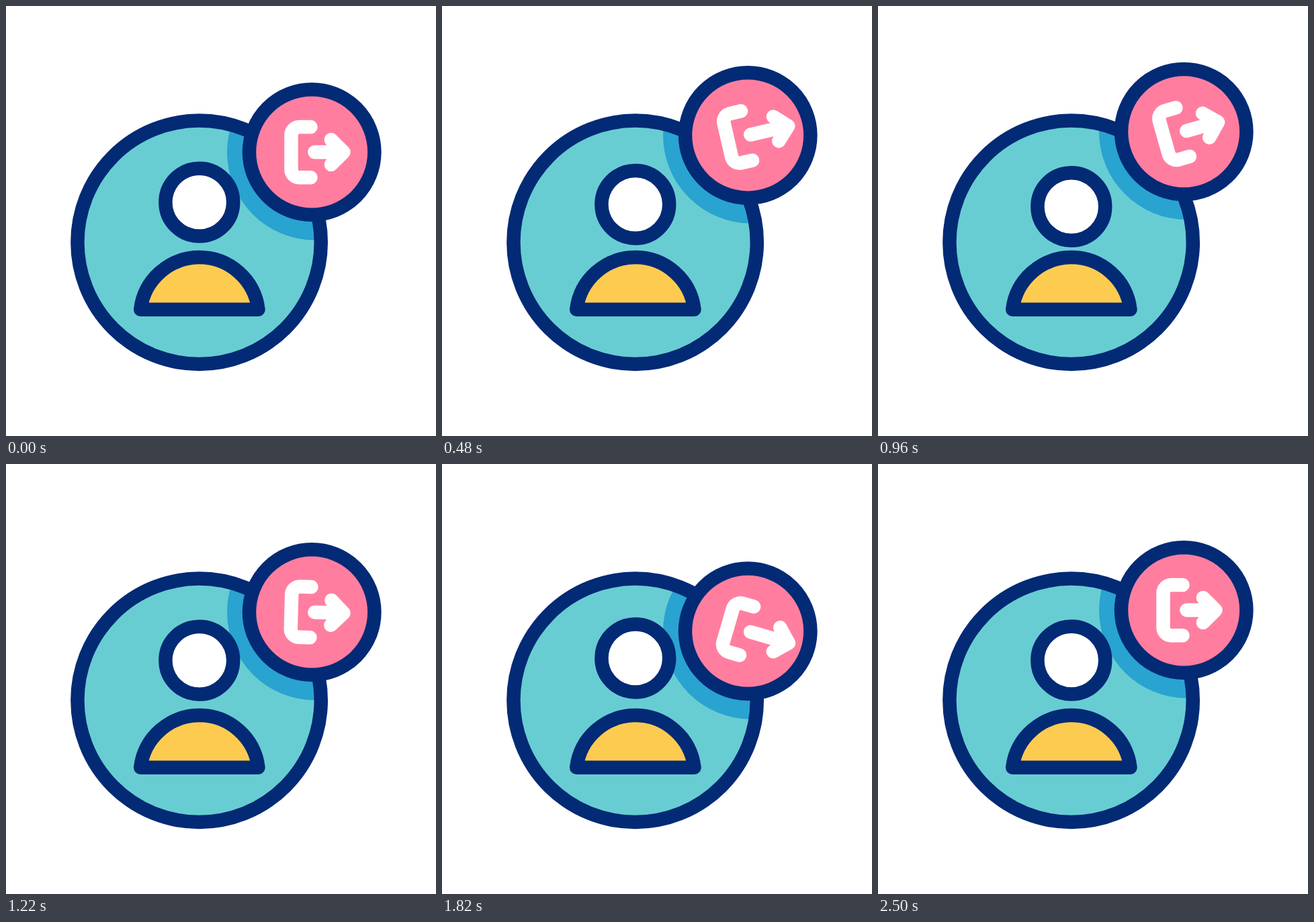
These frames come from a looping animation (640x640 px, 2620 ms). An HTML page:

```html
<!DOCTYPE html>
<html lang="en">
<head>
<meta charset="utf-8">
<title>User log out</title>
<style>
  html, body { margin: 0; width: 100%; height: 100%; overflow: hidden; background: #fff; }
  svg { display: block; width: 100%; height: 100%; }
  .line { stroke: #032a75; stroke-width: 20.5; stroke-linejoin: round; }
  .icon { fill: none; stroke: #fff; stroke-width: 20.5; stroke-linecap: round; stroke-linejoin: round; }
</style>
</head>
<body>
<svg viewBox="0 0 640 640">
  <clipPath id="disc"><circle cx="287.6" cy="351.8" r="181"/></clipPath>
  <circle cx="287.6" cy="351.8" r="181" fill="#68cdd2"/>
  <g clip-path="url(#disc)">
    <circle id="shadow" cx="460" cy="217.5" r="131" fill="#29a3cf"/>
  </g>
  <circle class="line" cx="287.6" cy="351.8" r="181.2" fill="none"/>
  <path class="line" fill="#fecb51" d="M200.2 451.7A88.3 88.3 0 0 1 375.5 451.7Z"/>
  <circle id="head" class="line" cx="287.8" cy="292.2" r="50.4" fill="#fff"/>
  <g id="badge">
    <circle class="line" r="93.2" fill="#ff7e9f"/>
    <g id="exit" class="icon">
      <path d="M-1.7 -37.5H-18.7A12 12 0 0 0 -30.7 -25.5V25.8A12 12 0 0 0 -18.7 37.8H-1.7"/>
      <path id="arrow"/>
    </g>
  </g>
</svg>
<script>
const LOOP = 2620;
const get = id => document.getElementById(id);
const shadow = get("shadow"), head = get("head"), badge = get("badge");
const exit = get("exit"), arrow = get("arrow");

// Eased track through evenly spaced values, holding the last one
function track(t, step, values) {
  const i = Math.floor(t / step);
  if (i >= values.length - 1) return values[values.length - 1];
  const s = t / step - i;
  return values[i] + (values[i + 1] - values[i]) * s * s * (3 - 2 * s);
}

function draw(t) {
  const swing = track(t, 800, [0, -1, 1, 0]);
  const lift = 38.5 * swing;
  const reach = track(t, 600, [0, 16, 0, 16, 0]);
  const nod = track(t, 312.5, [0, 13, -4.6, 6.5, 0, 13, -4.6, 6.5, 0]);
  const tip = 47.3 + reach;

  shadow.setAttribute("transform", `translate(0 ${lift})`);
  badge.setAttribute("transform", `translate(455.2 ${217.5 + lift})`);
  exit.setAttribute("transform", `rotate(${20 * swing})`);
  arrow.setAttribute("d", `M4.2 0H${tip}M${tip - 18.6} -18.6L${tip} 0L${tip - 18.6} 18.6`);
  head.setAttribute("transform", `translate(0 ${nod})`);
}

const start = performance.now();
function frame() {
  draw((performance.now() - start) % LOOP);
  requestAnimationFrame(frame);
}
draw(0);
requestAnimationFrame(frame);
</script>
</body>
</html>
```
